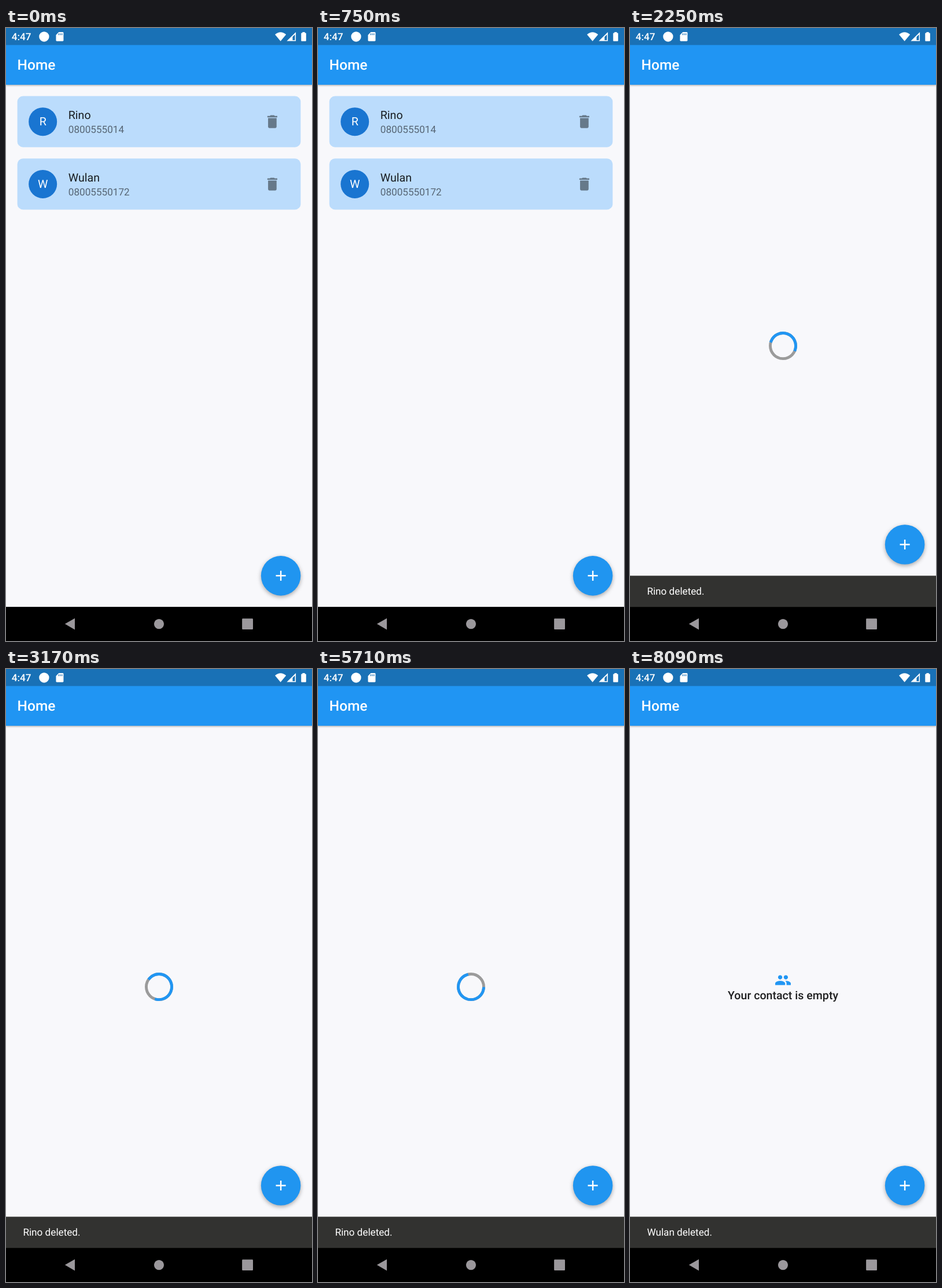
Animation of 529x1058 px, one loop 8.25 s. Source, as an HTML page:

```html
<!DOCTYPE html>
<html lang="en">
<head>
<meta charset="utf-8">
<title>Contacts</title>
<style>
  html, body { margin: 0; width: 100%; height: 100%; overflow: hidden; background: #000; }
  svg { display: block; width: 100%; height: 100%; }
  text { font-family: Roboto, sans-serif; text-rendering: geometricPrecision; }
  .bold { font-weight: 500; }
  .mid { text-anchor: middle; }
  .bar { filter: drop-shadow(0 1.5px 1.5px rgba(0, 0, 0, .32)); }
  .fab { filter: drop-shadow(0 2.5px 3px rgba(0, 0, 0, .33)); }
</style>
</head>
<body>
<!-- Units are dp: the screen is 432 x 864 -->
<svg viewBox="0 0 432 864">
  <defs>
    <path id="trash" d="M6 19c0 1.1.9 2 2 2h8c1.1 0 2-.9 2-2V7H6zM19 4h-3.5l-1-1h-5l-1 1H5v2h14z"/>
    <path id="plus" d="M19 13h-6v6h-2v-6H5v-2h6V5h2v6h6z"/>
    <path id="people" d="M16 11c1.66 0 2.99-1.34 2.99-3S17.66 5 16 5c-1.66 0-3 1.34-3 3s1.34 3 3 3zm-8 0c1.66 0 2.99-1.34 2.99-3S9.66 5 8 5C6.34 5 5 6.34 5 8s1.34 3 3 3zm0 2c-2.33 0-7 1.17-7 3.5V19h14v-2.5c0-2.33-4.67-3.5-7-3.5zm8 0c-.29 0-.62.02-.97.05 1.16.84 1.97 1.97 1.97 3.45V19h6v-2.5c0-2.33-4.67-3.5-7-3.5z"/>
  </defs>
  <rect width="432" height="864" fill="#f8f8fb"/>

  <g id="cards"></g>

  <g id="loader" fill="none" stroke-width="4">
    <circle cx="216" cy="448" r="18" stroke="#9b9b9b"/>
    <path id="arc" stroke="#2196f3" stroke-linecap="square"/>
  </g>

  <g id="empty">
    <use href="#people" x="204" y="426.5" fill="#2196f3"/>
    <text class="bold mid" x="216" y="465.4" font-size="16" fill="#1f1f20">Your contact is empty</text>
  </g>

  <g class="bar">
    <rect y="-4" width="432" height="84" fill="#2095f3"/>
  </g>
  <rect width="432" height="24" fill="#1971b6"/>
  <text class="bold" x="16" y="59.2" font-size="20" fill="#fff">Home</text>

  <g fill="#fff">
    <text class="bold" x="8" y="17.2" font-size="14">4:47</text>
    <circle cx="53.8" cy="12.2" r="7.1"/>
    <path d="M74.6 5.8h5.4q1.2 0 1.2 1.2v10.4q0 1.2-1.2 1.2h-8.2q-1.2 0-1.2-1.2V9.8z"/>
    <path d="M379.8 9.2Q387.6 2.6 395.4 9.2L387.6 18.6z"/>
    <path d="M409.2 5.8V18.4H396.4zM407.9 9.2L404.6 12.4V17.1H407.9z" fill-rule="evenodd"/>
    <path d="M418.5 5.8h3.4v1.2h1q.8 0 .8.8v9.9q0 .8-.8.8h-5.4q-.8 0-.8-.8V7.8q0-.8.8-.8h1z"/>
  </g>
  <path d="M74.6 7.6v2.4M76.8 7.6v2.4M79 7.6v2.4" stroke="#1971b6" stroke-width="1"/>

  <g id="fab">
    <circle class="fab" cx="388" cy="772" r="28" fill="#2095f0"/>
    <use href="#plus" x="376" y="760" fill="#fff"/>
  </g>
  <g id="snack">
    <rect y="816" width="432" height="48" fill="#323230"/>
    <text id="note" x="24" y="843" font-size="14" fill="#fff"></text>
  </g>

  <rect y="816" width="432" height="48" fill="#000"/>
  <g fill="#9b989c">
    <path d="M83.2 840L97.2 832V848z"/>
    <circle cx="216" cy="840" r="7"/>
    <rect x="333.3" y="832.3" width="15.4" height="15.4" rx="1"/>
  </g>
</svg>
<script>
const LOOP = 8250, SNACK = 44, SLIDE = 250;
const contacts = [['Rino', '0800555014'], ['Wulan', '08005550172']];
const $ = id => document.getElementById(id);

// start and end in ms, and the pace of the spinner's own clock
const loads = [
  { from: 1357, to: 3400, pace: .964 },
  { from: 5304, to: 7220, pace: 1.043 }
];
const notes = [
  { name: contacts[0][0], from: 1368, out: 5750 },
  { name: contacts[1][0], from: 6000, out: Infinity }
];

$('cards').innerHTML = contacts.map(([name, phone]) => `<g>
  <rect x="16" y="96" width="400" height="72" rx="8" fill="#bbdcfc"/>
  <circle cx="52" cy="132" r="20" fill="#1975d1"/>
  <text class="mid" x="52" y="137.5" font-size="16" fill="#fff">${name[0]}</text>
  <text x="88" y="128" font-size="16" fill="#000" fill-opacity=".87">${name}</text>
  <text x="88" y="148" font-size="14" fill="#000" fill-opacity=".54">${phone}</text>
  <use href="#trash" x="364" y="120" fill="#000" fill-opacity=".45"/></g>`).join('');
const cards = [...$('cards').children];

const clamp = x => Math.min(1, Math.max(0, x));
const show = (el, on) => el.setAttribute('display', on ? 'inline' : 'none');
const shift = (el, y) => el.setAttribute('transform', `translate(0 ${y})`);

// cubic-bezier(.4, 0, .2, 1)
function ease(x) {
  x = clamp(x);
  let lo = 0, hi = 1;
  for (let i = 0; i < 24; i++) {
    const s = (lo + hi) / 2, r = 1 - s;
    if (1.2 * r * r * s + .6 * r * s * s + s * s * s < x) lo = s; else hi = s;
  }
  return lo * lo * (3 - 2 * lo);
}

function point(deg) {
  const a = (deg - 90) * Math.PI / 180;
  return `${216 + 18 * Math.cos(a)} ${448 + 18 * Math.sin(a)}`;
}

function spin(ms) {
  const p = ms / 1333 % 1;
  const head = ease(p * 2) * 270, tail = ease(p * 2 - 1) * 270;
  const start = tail + ms / 2222 * 360 + p * 90;
  const sweep = Math.max(head - tail, .1);
  $('arc').setAttribute('d',
    `M${point(start)}A18 18 0 ${sweep > 180 ? 1 : 0} 1 ${point(start + sweep)}`);
}

function draw(t) {
  const load = loads.find(l => t >= l.from && t < l.to);
  show($('loader'), load);
  if (load) spin((t - load.from) * load.pace);

  show(cards[0], t < loads[0].from);
  show(cards[1], !load && t < loads[1].from);
  shift(cards[1], t < loads[0].from ? 88 : 0);
  show($('empty'), t >= loads[1].to);

  const note = notes.find(n => t >= n.from && t < n.out + SLIDE);
  let height = 0;
  if (note) {
    const leaving = t >= note.out;
    const k = clamp(leaving ? 1 - (t - note.out) / SLIDE : (t - note.from) / SLIDE);
    height = SNACK * ease(k);
    $('note').textContent = note.name + ' deleted.';
    $('note').setAttribute('opacity', leaving ? 1 : ease((k - .72) / .28));
  }
  shift($('snack'), -height);
  shift($('fab'), -height);
}

const begin = performance.now();
function tick() {
  draw((performance.now() - begin) % LOOP);
  requestAnimationFrame(tick);
}
tick();
</script>
</body>
</html>
```
